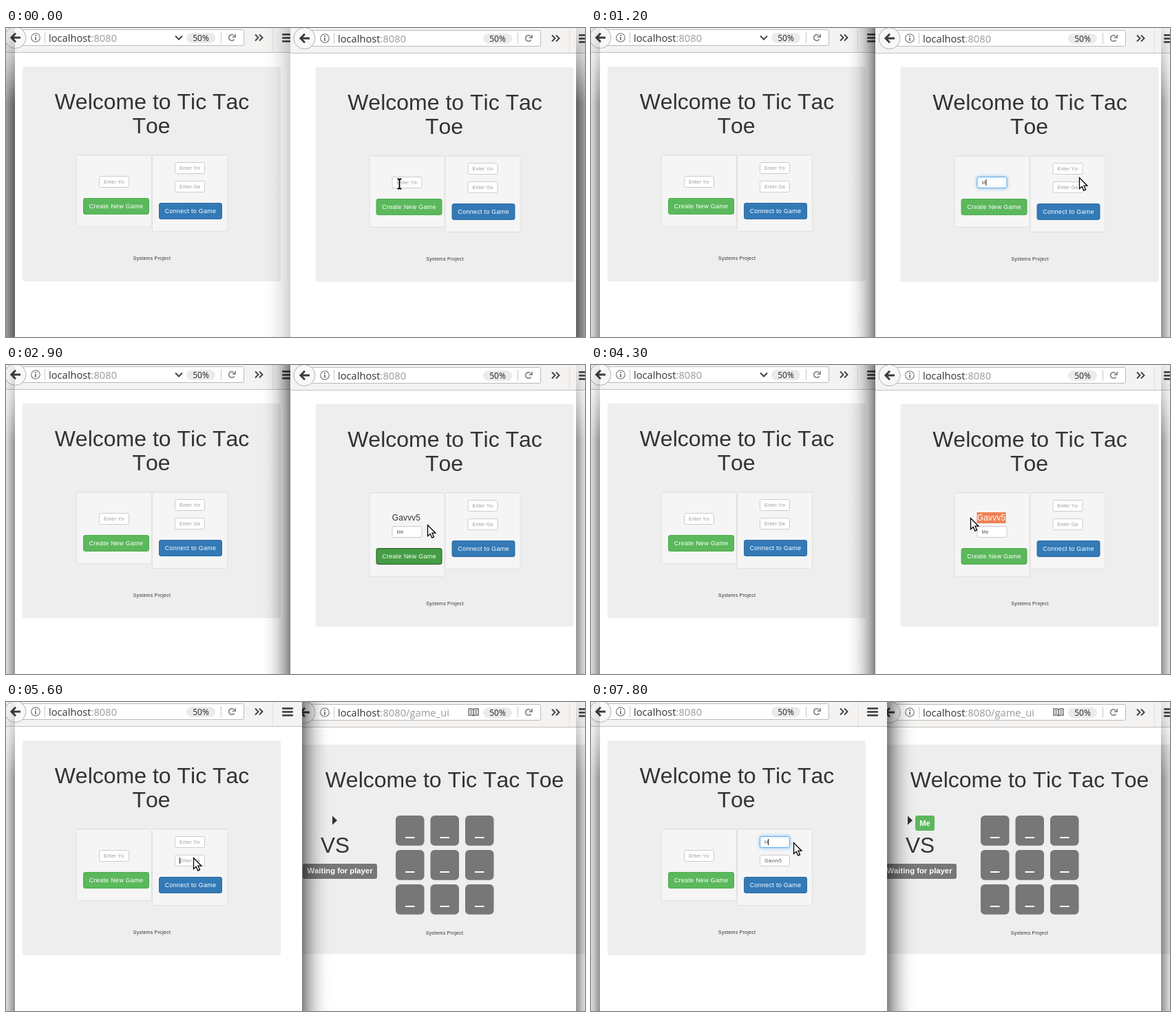
Recreate the animation shown at these times as an HTML page with a canvas. Size 841 by 449 pixels, loop 8000 ms.

```html
<!DOCTYPE html>
<html lang="en">
<head>
<meta charset="utf-8">
<title>Tic Tac Toe</title>
<style>
html, body { margin: 0; width: 100%; height: 100%; overflow: hidden; background: #fff; }
canvas { display: block; }
</style>
</head>
<body>
<canvas id="stage" width="841" height="449"></canvas>
<script>
const W = 841, H = 449, LOOP = 8000;
const ctx = document.getElementById('stage').getContext('2d');
const SANS = '"Liberation Sans", Arial, sans-serif';
const CHROME = '"Open Sans", "Noto Sans", sans-serif';
const GAME_ID = 'Gavvv5';

// Pointer path: time, x, y
const PATH = [
  [0, 571, 226], [300, 571, 226], [400, 616, 225], [500, 684, 220], [600, 709, 217],
  [1700, 709, 217], [1900, 680, 232], [2200, 604, 253], [2600, 604, 253],
  [2900, 612, 232], [3100, 606, 222], [3500, 562, 222], [3600, 558, 223],
  [4200, 558, 223], [4300, 551, 222], [4500, 480, 216], [4900, 300, 222],
  [5100, 271, 226], [5200, 272, 226], [6500, 272, 226], [6900, 264, 204],
  [7100, 264, 204], [7400, 294, 204], [8000, 294, 204]
];

const clamp = v => Math.max(0, Math.min(1, v));
const ramp = (t, from, to) => clamp((t - from) / (to - from));
const mix = (a, b, k) => a + (b - a) * k;

function pointerAt(t) {
  let i = 1;
  while (i < PATH.length - 1 && PATH[i][0] < t) i++;
  const [t0, x0, y0] = PATH[i - 1], [t1, x1, y1] = PATH[i];
  const k = ramp(t, t0, t1);
  return [Math.round(mix(x0, x1, k)), Math.round(mix(y0, y1, k))];
}

function box(x, y, w, h, r, fill, stroke) {
  ctx.beginPath();
  ctx.roundRect(x, y, w, h, r);
  if (fill) { ctx.fillStyle = fill; ctx.fill(); }
  if (stroke) { ctx.strokeStyle = stroke; ctx.lineWidth = 1; ctx.stroke(); }
}

function text(str, x, y, size, color, { align = 'left', spacing = 0, weight = '', family = SANS } = {}) {
  ctx.font = `${weight} ${size}px ${family}`;
  ctx.letterSpacing = spacing + 'px';
  ctx.fontKerning = 'none';
  ctx.textAlign = align;
  ctx.fillStyle = color;
  ctx.fillText(str, x, y);
  return ctx.measureText(str).width;
}

function lines(color, width, ...paths) {
  ctx.strokeStyle = color;
  ctx.lineWidth = width;
  ctx.beginPath();
  for (const p of paths) {
    ctx.moveTo(p[0], p[1]);
    for (let i = 2; i < p.length; i += 2) ctx.lineTo(p[i], p[i + 1]);
  }
  ctx.stroke();
}

function polygon(color, points) {
  ctx.beginPath();
  for (let i = 0; i < points.length; i += 2) ctx.lineTo(points[i], points[i + 1]);
  ctx.closePath();
  ctx.fillStyle = color;
  ctx.fill();
}

// ---- browser chrome ----
function reloadIcon(x, y) {
  ctx.strokeStyle = '#8a8f94';
  ctx.lineWidth = 2;
  ctx.beginPath();
  ctx.arc(x, y, 4.3, 0.6, 5.3);
  ctx.stroke();
  polygon('#8a8f94', [x + 6, y - 6, x + 6, y, x, y]);
}

function bookIcon(x, y) {
  lines('#666', 1.4,
    [x, y - 4, x - 2, y - 5, x - 7, y - 5, x - 7, y + 4, x - 2, y + 4, x, y + 5, x + 2, y + 4,
      x + 7, y + 4, x + 7, y - 5, x + 2, y - 5, x, y - 4, x, y + 5],
    [x - 5, y - 2, x - 2, y - 2], [x - 5, y + 1, x - 2, y + 1],
    [x + 2, y - 2, x + 5, y - 2], [x + 2, y + 1, x + 5, y + 1]);
}

// dx shifts the left-hand controls, ex the right-hand ones
function toolbar(dx, ex, dy, { path = '', chevron, loading, reader }) {
  ctx.save();
  ctx.translate(0, dy);
  ctx.fillStyle = '#f4f3f2';
  ctx.fillRect(dx - 20, -1, 480, 36);
  lines('#c3c1bf', 1, [dx - 20, 35.5, dx + 460, 35.5]);
  box(dx + 14.5, 2.5, 331 + ex - dx, 23, 2, '#fff', '#bcbab8');

  ctx.beginPath();
  ctx.arc(dx + 13.5, 14, 15.5, 0, 7);
  ctx.fillStyle = '#f8f8f7';
  ctx.fill();
  ctx.strokeStyle = '#b3b1af';
  ctx.lineWidth = 1;
  ctx.stroke();
  lines('#3b3b3b', 2.8, [dx + 8, 14, dx + 21, 14], [dx + 14, 7.8, dx + 7.8, 14, dx + 14, 20.2]);

  ctx.beginPath();
  ctx.arc(dx + 43, 14, 6.3, 0, 7);
  ctx.strokeStyle = '#707070';
  ctx.lineWidth = 1.1;
  ctx.stroke();
  ctx.fillStyle = '#606060';
  ctx.fillRect(dx + 42.2, 10, 1.6, 1.8);
  ctx.fillRect(dx + 42.2, 13, 1.6, 4.8);
  lines('#c8c8c8', 1, [dx + 56.5, 6, dx + 56.5, 22]);
  const host = text('localhost', dx + 62, 19.5, 14.7, '#333', { family: CHROME });
  text(':8080' + path, dx + 62 + host, 19.5, 14.7, '#999', { family: CHROME });

  if (chevron) lines('#444', 2, [ex + 246, 11.5, ex + 251, 16.5, ex + 256, 11.5]);
  if (reader) bookIcon(ex + 248, 14);
  box(ex + 262, 7, 42, 15, 7.5, '#ebebeb');
  text('50%', ex + 283, 18.5, 12, '#222', { align: 'center', family: CHROME });
  lines('#c8c8c8', 1, [ex + 312.5, 6, ex + 312.5, 22]);
  if (loading) lines('#85898d', 2.2, [ex + 325, 10, ex + 333, 18], [ex + 333, 10, ex + 325, 18]);
  else reloadIcon(ex + 328, 14);
  lines('#444', 2, [ex + 362, 9.5, ex + 366.5, 14, ex + 362, 18.5], [ex + 368, 9.5, ex + 372.5, 14, ex + 368, 18.5]);
  lines('#e2e0de', 1, [ex + 387.5, 0, ex + 387.5, 35]);
  for (const y of [8, 13, 18]) box(ex + 401, y, 16, 2.8, 1, '#474747');
  ctx.restore();
}

// ---- pages ----
function input(x, y, { value = '', hint, focus = 0, caret = focus > 0 }) {
  ctx.save();
  if (focus) {
    ctx.shadowColor = `rgba(102,175,233,${0.7 * focus})`;
    ctx.shadowBlur = 5;
  }
  const border = `rgb(${mix(204, 102, focus)},${mix(204, 175, focus)},${mix(204, 233, focus)})`;
  box(x + .5, y + .5, 43, 16, 2, '#fff', border);
  ctx.restore();
  ctx.save();
  ctx.beginPath();
  ctx.rect(x + 6, y + 1, 31, 15);
  ctx.clip();
  const w = text(value || hint, x + 7, y + 11, 7, value ? '#555' : '#999', { spacing: .25 });
  if (caret) {
    ctx.fillStyle = '#222';
    ctx.fillRect(Math.round(x + 7 + (value ? w : 0)), y + 4, 1, 9);
  }
  ctx.restore();
}

function button(label, x, y, w, fill, border) {
  box(x + .5, y + .5, w - 1, 23, 2.5, fill, border);
  text(label, x + w / 2, y + 15, 9, '#fff', { align: 'center', spacing: .25 });
}

function card(x, y, w, h) {
  box(x + .5, y + .5, w - 1, h - 1, 2, '#f5f5f5', '#e0e0e0');
  lines('#ebebeb', 1, [x + 2, y + 1.5, x + w - 2, y + 1.5]);
}

function footer(x, y) {
  text('Systems Project', x, y, 7, '#333', { align: 'center', spacing: .25 });
}

function welcomePage(dx, dy, s) {
  const low = s.gameId ? 18 : 0, grow = s.gameId ? 11 : 0;
  ctx.save();
  ctx.translate(dx, dy);
  box(24, 56, 375, 312 + grow, 3, '#eee');
  text('Welcome to Tic Tac', 212, 118, 32, '#333', { align: 'center' });
  text('Toe', 211, 153, 32, '#333', { align: 'center' });
  card(102, 184, 110, 105 + low);
  card(212, 184, 110, 112);
  if (s.gameId) {
    if (s.selected) {
      ctx.fillStyle = '#ee8253';
      ctx.fillRect(135 + 42 * (1 - s.selected), 213, 42 * s.selected, 16);
    }
    text(GAME_ID, 156, 225, 12, s.selected > .5 ? '#fff' : '#333', { align: 'center', spacing: .1 });
  }
  input(135, 215 + low, { hint: 'Enter Your Name', ...s.name });
  button('Create New Game', 112, 247 + low, 96, s.active ? '#449d44' : '#5cb85c', s.active ? '#255625' : '#4cae4c');
  input(245, 195, { hint: 'Enter Your Name', ...s.joinName });
  input(245, 222, { hint: 'Enter Game Id', ...s.joinId });
  button('Connect to Game', 222, 254, 92, '#337ab7', '#2e6da4');
  footer(212, 337 + grow);
  ctx.restore();
}

function gamePage(joined) {
  ctx.fillStyle = '#eee';
  ctx.fillRect(413, 62, W - 413, 304);
  text('Welcome to Tic Tac Toe', 637, 124, 32, '#333', { align: 'center' });
  const tip = joined ? 460 : 474;
  polygon('#333', [tip, 165.5, tip + 7, 172, tip, 178.5]);
  if (joined) {
    box(471, 165, 28, 22, 3, '#5cb85c');
    text('Me', 485, 180, 11.25, '#fff', { align: 'center', weight: 'bold' });
  }
  text('VS', 478, 219, 31.5, '#333', { align: 'center' });
  const x = joined ? 423 : 431;
  box(x, 235, 108, 22, 3, '#777');
  text('Waiting for player', x + 54, 249, 11.25, '#fff', { align: 'center', weight: 'bold' });
  for (let i = 0; i < 9; i++) {
    const cx = 566 + (i % 3) * 50.5, cy = 165 + Math.floor(i / 3) * 50;
    box(cx, cy, 41.5, 43.7, 6, '#777');
    ctx.fillStyle = '#fff';
    ctx.fillRect(cx + 14, cy + 31, 13.5, 2);
  }
  footer(637, 338);
}

// ---- shadows and pointer ----
function edgeShadow(x, dir, alpha) {
  const g = ctx.createLinearGradient(x, 0, x + dir * 46, 0);
  for (let k = 0; k <= 1; k += .125) g.addColorStop(k, `rgba(0,0,0,${alpha * (1 - k) ** 2.3})`);
  ctx.fillStyle = g;
  ctx.fillRect(dir < 0 ? x - 46 : x, 0, 46, H);
}

function frameShadow(near, far) {
  for (let i = 0; i < 13; i++) {
    const a = mix(near, far, i / 12);
    const g = ctx.createLinearGradient(0, 0, 0, 110);
    g.addColorStop(0, `rgba(0,0,0,${a * .12})`);
    g.addColorStop(.35, `rgba(0,0,0,${a * .4})`);
    g.addColorStop(1, `rgba(0,0,0,${a})`);
    ctx.fillStyle = g;
    ctx.fillRect(12 - i, 0, 1, H);
    ctx.fillRect(828 + i, 0, 1, H);
  }
}

function outlined(points, fill, stroke, width) {
  ctx.beginPath();
  for (let i = 0; i < points.length; i += 2) ctx.lineTo(points[i], points[i + 1]);
  ctx.closePath();
  ctx.fillStyle = fill;
  ctx.fill();
  ctx.strokeStyle = stroke;
  ctx.lineWidth = width;
  ctx.stroke();
}

function pointer(x, y, shape) {
  ctx.save();
  ctx.translate(x + .5, y + .5);
  if (shape === 'beam') {
    const beam = [[-3, -7, -1, -7, 0, -6, 1, -7, 3, -7], [0, -6, 0, 6], [-3, 7, -1, 7, 0, 6, 1, 7, 3, 7]];
    lines('#fff', 4, ...beam);
    lines('#000', 1.8, ...beam);
  } else if (shape === 'hand') {
    outlined([-1, 0, 1, 0, 2, 6, 4, 5, 5, 7, 7, 6, 8, 8, 10, 8, 10, 12, 8, 17, 0, 17, -5, 10, -3, 8, -1, 10], '#fff', '#000', 1.2);
  } else {
    outlined([0, 0, 0, 16, 3.7, 12.8, 6.3, 18.6, 9, 17.4, 6.5, 11.7, 11.4, 11.7], '#fff', '#000', 1.3);
  }
  ctx.restore();
}

function pointerShape(t) {
  if (t < 400 || (t >= 3100 && t < 3600) || (t >= 6800 && t < 7200)) return 'beam';
  return t >= 2100 && t < 2600 ? 'hand' : 'arrow';
}

// ---- scene ----
function leftWindow(t) {
  const onId = t >= 5600 && t < 7000;
  ctx.fillStyle = '#fff';
  ctx.fillRect(0, 0, 430, H);
  welcomePage(0, 0, {
    name: {},
    joinName: { value: t >= 7800 ? 'H' : '', focus: ramp(t, 6900, 7100) },
    joinId: { value: t >= 6300 ? GAME_ID : '', focus: onId ? ramp(t, 5600, 5800) : 0, caret: onId }
  });
  toolbar(0, 0, 0, { chevron: t < 4700 });
}

function rightWindow(t) {
  const playing = t >= 5500, typing = t >= 300 && t < 2400;
  ctx.fillStyle = '#fff';
  ctx.fillRect(413, 0, W - 413, H);
  if (playing) gamePage(t >= 5700);
  else welcomePage(425.5, 1, {
    gameId: t >= 2500,
    selected: ramp(t, 3100, 3500),
    active: t >= 2100 && t < 3100,
    name: {
      value: t >= 1400 ? 'Me' : t >= 1200 ? 'M' : '',
      focus: typing ? ramp(t, 200, 500) : 0
    },
    joinName: {}, joinId: {}
  });
  toolbar(420, 431, 1, { path: playing ? '/game_ui' : '', reader: playing, loading: t >= 5400 && !playing });
}

function clipped(x, w, draw) {
  ctx.save();
  ctx.beginPath();
  ctx.rect(x, 0, w, H);
  ctx.clip();
  draw();
  ctx.restore();
}

function render(time) {
  const t = Math.floor((time % LOOP) / 100) * 100;
  const shift = ramp(t, 200, 600);
  if (t >= 5500) {
    rightWindow(t);
    edgeShadow(430, 1, mix(.25, .5, ramp(t, 5500, 5600)));
    clipped(0, 430, () => leftWindow(t));
  } else {
    leftWindow(t);
    edgeShadow(413, -1, mix(.18, .5, shift));
    clipped(413, W - 413, () => rightWindow(t));
  }
  frameShadow(mix(.62, .42, shift), mix(.4, .14, shift));
  pointer(...pointerAt(t), pointerShape(t));
}

const start = performance.now();
function tick() {
  render(performance.now() - start);
  requestAnimationFrame(tick);
}
tick();
</script>
</body>
</html>
```
